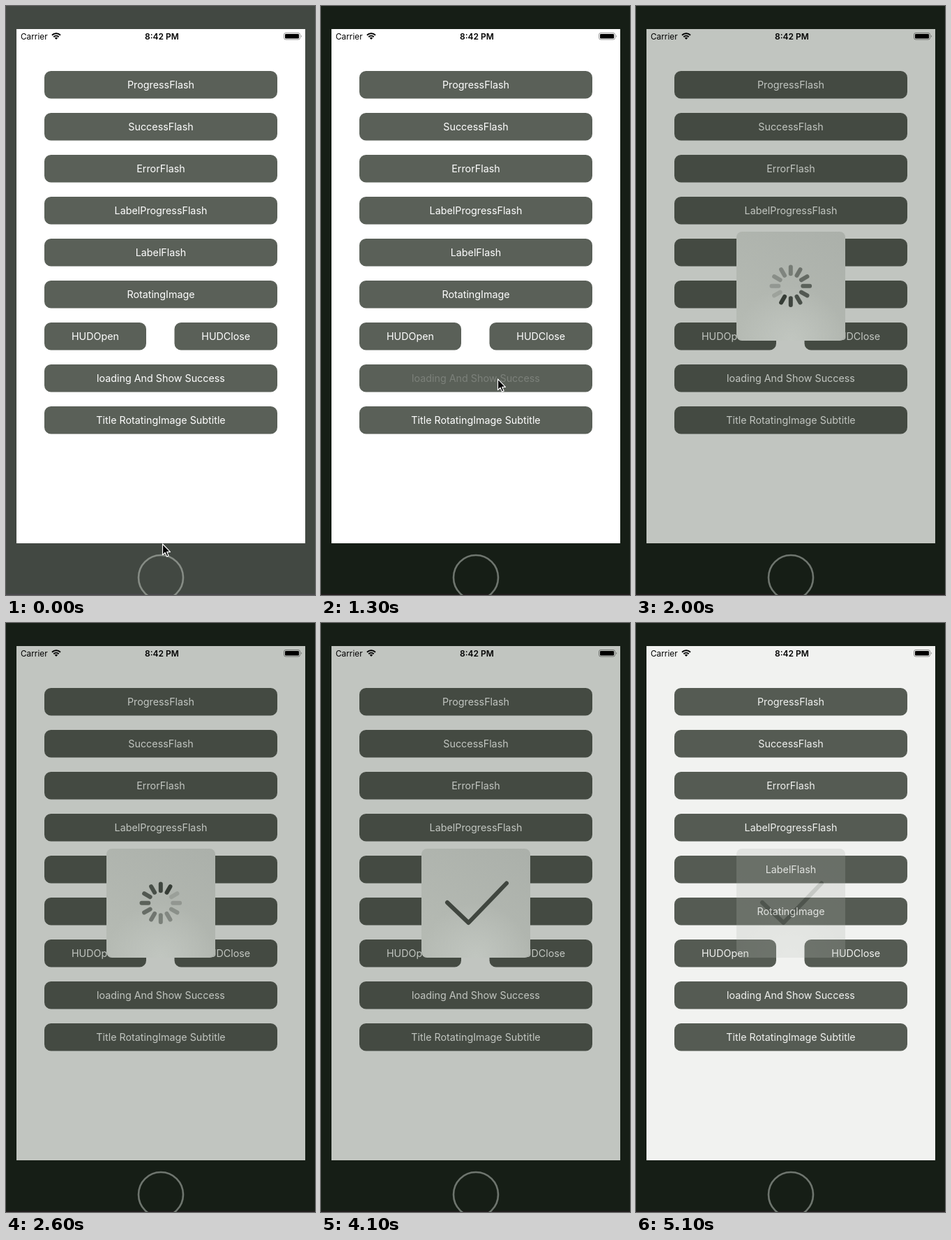
Animation, 443 px wide and 843 px high, one loop 5.2 s. Source, as an HTML page:

```html
<!DOCTYPE html>
<html lang="en">
<head>
<meta charset="utf-8">
<title>HUD demo</title>
<style>
  html, body { margin: 0; width: 100%; height: 100%; overflow: hidden; }
  svg { display: block; width: 100vw; height: 100vh; }
  text { font-family: Inter, Roboto, sans-serif; }
  #buttons rect { fill: #5a6058; }
  #buttons text { font-size: 14.3px; fill: #fff; text-anchor: middle; }
  #dim { fill: #c1c5c0; mix-blend-mode: multiply; }
  #spinner, #check { stroke: #363d36; stroke-width: 6; stroke-linecap: round; fill: none; }
  #check { stroke: #40463f; stroke-linejoin: round; }
</style>
</head>
<body>
<svg viewBox="0 0 443 843">
  <defs>
    <linearGradient id="glass" x1="1" y1="0" x2=".3" y2="1">
      <stop offset="0" stop-color="#abb0aa"/>
      <stop offset="1" stop-color="#b5bab3"/>
    </linearGradient>
    <radialGradient id="glow" cx=".5" cy="1" r=".5">
      <stop offset="0" stop-color="#c1c6c0"/>
      <stop offset="1" stop-color="#c1c6c0" stop-opacity="0"/>
    </radialGradient>
  </defs>

  <rect id="bezel" width="443" height="843"/>
  <rect id="edge" y="841.5" width="443" height="1.5"/>
  <circle id="home" cx="222" cy="818" r="32" fill="none" stroke-width="2.6"/>
  <rect x="15" y="33" width="414" height="736" fill="#fff"/>
  <g id="buttons"></g>
  <rect id="dim" x="15" y="33" width="414" height="736"/>

  <g id="status">
    <text x="21" y="47.5" font-size="11.8">Carrier</text>
    <text x="223.5" y="47.5" font-size="12" font-weight="600" text-anchor="middle">8:42 PM</text>
    <path d="M66 41.8A8.6 8.6 0 0 1 78 41.8M68.3 44.2A5.3 5.3 0 0 1 75.7 44.2" fill="none" stroke="#000" stroke-width="2"/>
    <path d="M72 48L69.8 45.7A3.2 3.2 0 0 1 74.2 45.7Z"/>
    <rect x="398.5" y="38.5" width="23" height="9.5" rx="2.5" fill="none" stroke="#000" stroke-opacity=".4"/>
    <rect x="400" y="40" width="20" height="6.5" rx="1.2"/>
    <path d="M423 41.5a2 2 0 0 1 0 3.5z" fill-opacity=".4"/>
  </g>

  <g id="hud">
    <rect x="144" y="323" width="156" height="156" rx="8" fill="url(#glass)"/>
    <rect x="144" y="323" width="156" height="156" rx="8" fill="url(#glow)"/>
    <g id="spinner" transform="translate(221.8 400.8)"></g>
    <path id="check" d="M181 400L211.5 429L266 372.5" pathLength="1"/>
  </g>

  <path id="cursor" d="M0 0V15.6L3.6 12.3L6 18L8.6 16.9L6.2 11.3H11Z" stroke="#fff" stroke-width="1.2" stroke-linejoin="round"/>
</svg>
<script>
const LOOP = 5200, STEP = 100, SPOKES = 12;
const PRESS = 1200, RELEASE = 1300, SHOW = 1400, DONE = 3455, HIDE = 4620;
const $ = id => document.getElementById(id);
const clamp = v => Math.max(0, Math.min(1, v));
const smooth = v => v * v * (3 - 2 * v);

function add(parent, tag, attrs, content = '') {
  const el = document.createElementNS('http://www.w3.org/2000/svg', tag);
  for (const key in attrs) el.setAttribute(key, attrs[key]);
  el.textContent = content;
  return parent.appendChild(el);
}

function addButton(label, row, x = 55, width = 334) {
  const y = 93 + row * 60;
  add($('buttons'), 'rect', { x, y, width, height: 39.5, rx: 9.5 });
  return add($('buttons'), 'text', { x: x + width / 2, y: y + 25.2 }, label);
}

['ProgressFlash', 'SuccessFlash', 'ErrorFlash', 'LabelProgressFlash', 'LabelFlash', 'RotatingImage']
  .forEach((label, row) => addButton(label, row));
addButton('HUDOpen', 6, 55, 146);
addButton('HUDClose', 6, 241.5, 147.5);
const pressedLabel = addButton('loading And Show Success', 7);
addButton('Title RotatingImage Subtitle', 8);

const spokes = Array.from({ length: SPOKES }, (_, i) =>
  add($('spinner'), 'path', { d: 'M0 -17.5V-27.3', transform: `rotate(${i * 360 / SPOKES})` }));

// time, x, y of the pointer tip
const pointerPath = [
  [0, 224.5, 770], [100, 226, 735], [200, 234, 600], [300, 250, 455], [400, 260, 415],
  [500, 258, 480], [600, 253, 541], [900, 253.5, 534]
];

function pointerAt(t) {
  const next = pointerPath.findIndex(p => p[0] > t);
  if (next < 0) return pointerPath.at(-1).slice(1);
  const a = pointerPath[next - 1], b = pointerPath[next];
  const k = (t - a[0]) / (b[0] - a[0]);
  return [1, 2].map(i => a[i] + (b[i] - a[i]) * k);
}

const show = (id, visible) => $(id).setAttribute('visibility', visible ? 'inherit' : 'hidden');

function draw(t) {
  const active = t >= PRESS;
  $('bezel').setAttribute('fill', active ? '#161e16' : '#424842');
  $('edge').setAttribute('fill', active ? '#231c1e' : '#4a484d');
  $('home').setAttribute('stroke', active ? '#6e756e' : '#868c85');

  pressedLabel.setAttribute('opacity', active ? 0.2 + 0.8 * clamp((t - RELEASE) / 180) : 1);

  const hudAlpha = t < SHOW ? 0 : 1 - smooth(clamp((t - HIDE) / 700));
  $('dim').setAttribute('opacity', hudAlpha);
  $('hud').setAttribute('opacity', hudAlpha);

  const head = Math.floor(t / STEP) - 13 + 2 * SPOKES;
  spokes.forEach((spoke, i) => spoke.setAttribute('opacity', 1 - 0.075 * ((head - i) % SPOKES)));
  show('spinner', t < DONE);

  const drawn = clamp((t - DONE) / 345);
  $('check').setAttribute('stroke-dasharray', `${drawn} 2`);
  show('check', drawn > 0);

  $('cursor').setAttribute('transform', `translate(${pointerAt(t)})`);
  show('cursor', t < 1600);
}

const start = performance.now();
function tick() {
  const t = (performance.now() - start) % LOOP;
  draw(Math.floor(t / STEP) * STEP);
  requestAnimationFrame(tick);
}
tick();
</script>
</body>
</html>
```
